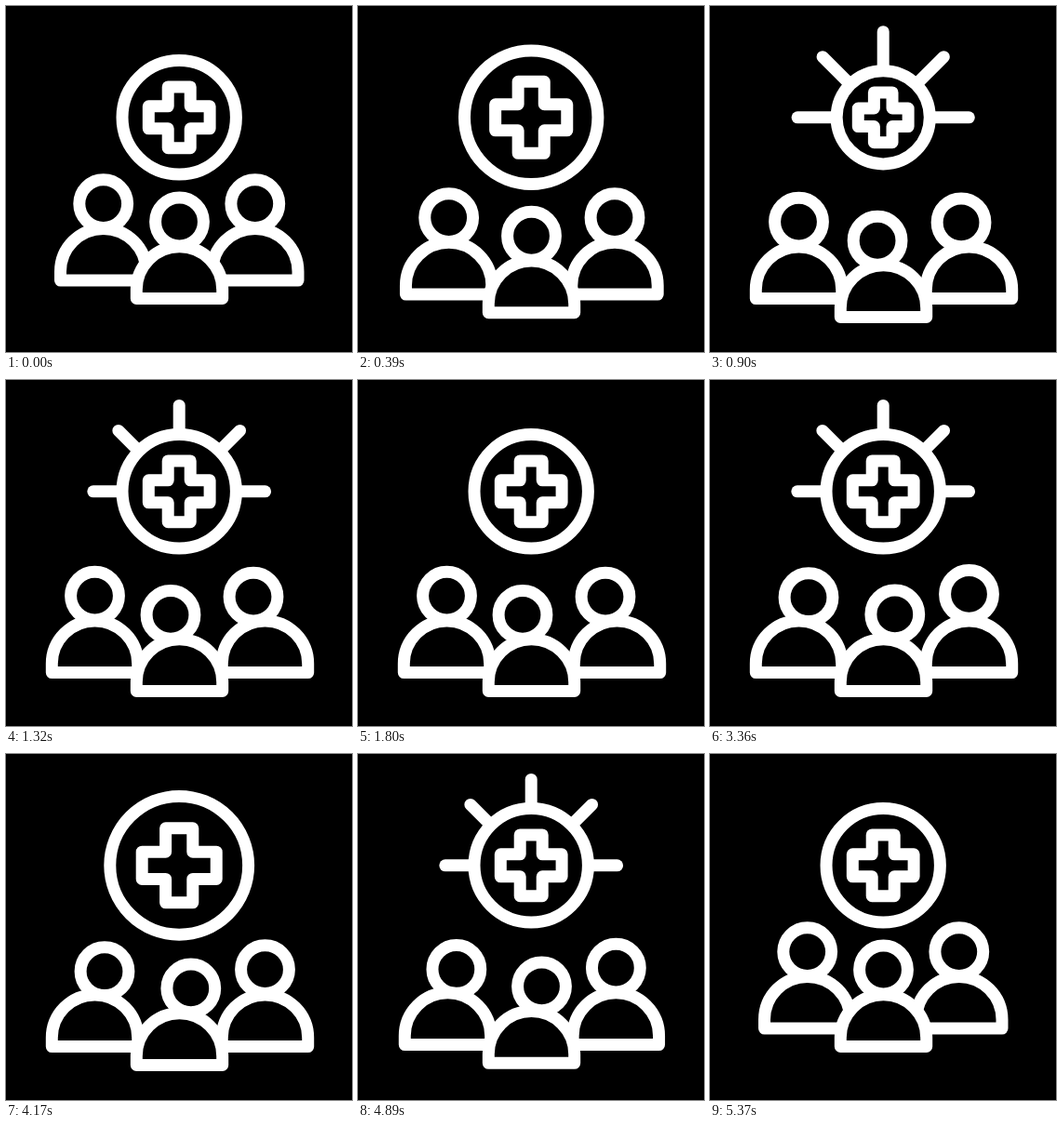
Recreate the animation shown at these times as an HTML page with a canvas. Size 372 by 372 pixels, loop 5400 ms.

```html
<!DOCTYPE html>
<html lang="en">
<head>
<meta charset="utf-8">
<style>
html, body { margin: 0; height: 100%; overflow: hidden; background: #000; }
canvas { display: block; }
</style>
</head>
<body>
<canvas id="stage" width="372" height="372"></canvas>
<script>
const ctx = document.getElementById('stage').getContext('2d');
const LOOP = 5400;
const PULSES = [0, 1980, 3590];
const CX = 186.2, CY = 119.8;

ctx.strokeStyle = '#fff';
ctx.fillStyle = '#000';
ctx.lineWidth = 13;
ctx.lineCap = ctx.lineJoin = 'round';

// Eased value through [time, value] keys, held outside them.
function track(t, keys) {
  if (t <= keys[0][0]) return keys[0][1];
  for (let i = 1; i < keys.length; i++) {
    const [t0, a] = keys[i - 1], [t1, b] = keys[i];
    if (t < t1) {
      const p = (t - t0) / (t1 - t0);
      return a + (b - a) * p * p * (3 - 2 * p);
    }
  }
  return keys[keys.length - 1][1];
}

function shape(build) {
  ctx.beginPath();
  build();
  ctx.fill();
  ctx.stroke();
}

const disc = (x, y, r) => shape(() => ctx.arc(x, y, r, 0, 2 * Math.PI));

function person(x, y, dx, dy) {
  disc(x + dx, y + dy, 25.9);
  shape(() => {
    ctx.arc(x, y + 73, 46.2, Math.PI, 0);
    ctx.lineTo(x + 46.2, y + 82.5);
    ctx.lineTo(x - 46.2, y + 82.5);
    ctx.closePath();
  });
}

function rays(t) {
  // Each burst is drawn back in as the next pulse begins to swell.
  const reach = Math.max(...PULSES.map(s =>
    track(t - s, [[720, 50], [910, 92.4], [1690, 92.4], [1780, 50]])));
  if (reach <= 50.5) return;
  for (let i = 0; i < 5; i++) {
    const a = Math.PI * (1 + i / 4), c = Math.cos(a), s = Math.sin(a);
    ctx.beginPath();
    ctx.moveTo(CX + 50 * c, CY + 50 * s);
    ctx.lineTo(CX + reach * c, CY + reach * s);
    ctx.stroke();
  }
}

function badge(t) {
  const start = PULSES.filter(s => s <= t).pop();
  const k = track(t - start, [[0, 1], [560, 1.22], [920, 0.815], [1290, 1]]);
  disc(CX, CY, 61.2 * k);
  const long = 32.9 * k, arm = 12 * k;
  shape(() => {
    for (let i = 0; i < 4; i++) {
      const c = [1, 0, -1, 0][i], s = [0, 1, 0, -1][i];
      for (const [x, y] of [[arm, -arm], [long, -arm], [long, arm]])
        ctx.lineTo(CX + x * c - y * s, CY + x * s + y * c);
    }
    ctx.closePath();
  });
}

function people(t) {
  const spread = track(t, [[0, 0], [570, 1], [4770, 1], [5370, 0]]);
  const left = track(t, [[560, 0], [1110, 1], [2420, 1], [3040, 0]]);
  const right = track(t, [[2420, 0], [3040, 1], [4770, 1], [5370, 0]]);
  const lift = track(t, [[2420, 0], [3040, 1], [3400, 1], [4560, 0]]);
  const y = 212.6 + 19.5 * spread;
  person(104.7 - 9.2 * spread, y, 10.5 * right, 1.6 * right);
  person(267.8 + 10.7 * spread, y, -12.5 * left, left - 1.8 * lift);
  person(186.5, 232 + 19.9 * spread, 12.3 * right - 9.5 * left, 0.5 * left);
}

function frame() {
  const t = performance.now() % LOOP;
  ctx.fillRect(0, 0, 372, 372);
  rays(t);
  badge(t);
  people(t);
  requestAnimationFrame(frame);
}
frame();
</script>
</body>
</html>
```
